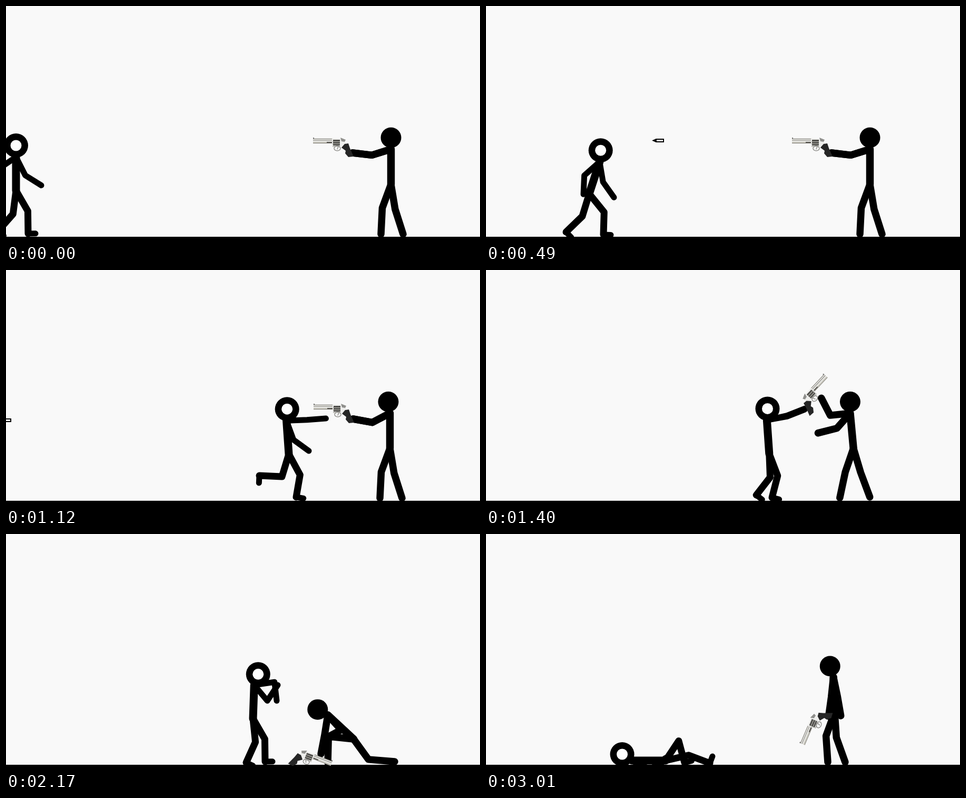
Recreate the animation shown at these times as an HTML page with a canvas. Size 900x450 px, loop 3290 ms.

```html
<!DOCTYPE html>
<html lang="en">
<head>
<meta charset="utf-8">
<title>Stick duel</title>
<style>
html, body { margin: 0; width: 100%; height: 100%; overflow: hidden; background: #f9f9f9; }
canvas { display: block; }
</style>
</head>
<body>
<canvas id="stage" width="900" height="450"></canvas>
<script>
const ctx = document.getElementById('stage').getContext('2d');
const LOOP = 3290, STEP = 70, RAD = Math.PI / 180;
const DROP = 18, GRAB = 33; // ticks between which the gun is loose

const mix = (a, b, k) => a + (b - a) * k;
const from = ([x, y], len, deg) => [x + len * Math.sin(deg * RAD), y - len * Math.cos(deg * RAD)];

const runnerRig = { face: 1, torso: 64, head: 22, arm: [39, 36], leg: [45, 43] };
const gunmanRig = { face: -1, torso: 67, head: 22, arm: [38, 37], leg: [48, 50] };

// A pose gives hip height, body angles, hands and feet; x counts from the hip
const enter = { y: 352, lean: 0, nod: 0, hands: [[48, 342], [-33, 346]], feet: [[23, 434], [-34, 429]] };
const stride = { y: 358, lean: 18, nod: 5, hands: [[47, 365], [-11, 359]], feet: [[27, 436], [-44, 431]] };
const duck = { ...stride, y: 374, lean: 38 };
const leap = { y: 254, lean: 5, nod: 5, hands: [[64, 200], [-36, 240]], feet: [[28, 285], [-36, 285]] };
const reach = { y: 351, lean: -4, nod: 3, hands: [[72, 283], [38, 345]], feet: [[14, 433], [-56, 392]] };
const grapple = { y: 350, lean: -4, nod: 3, hands: [[66, 262], [62, 240]], feet: [[3, 434], [-12, 434]] };
const guard = { y: 352, lean: 2, nod: 20, hands: [[45, 318], [47, 288]], feet: [[23, 434], [-13, 436]], crossed: true };
const punch = { ...guard, nod: 5, hands: [[85, 280], [45, 298]], crossed: false };
const cower = { ...guard, nod: 11, lean: 0, hands: [[28, 336], [39, 305]], feet: [[15, 437], [-25, 437]] };
const shot = { ...cower, lean: -20, nod: -25 };
const topple = { y: 397, lean: -53, nod: -60, hands: [[6, 322], [-4, 393]], feet: [[38, 425], [50, 436]] };
const lying = { y: 432, lean: -90, nod: -57, hands: [[0, 427], [0, 431]], feet: [[36, 436], [84, 437]] };

const both = (x, y) => [[x, y], [x, y]];
const aim = { y: 340, lean: 0, nod: 0, hands: both(-73, 280), feet: [[-19, 435], [23, 435]], tilt: 0 };
const recoil = { ...aim, lean: 14, nod: 22, hands: both(-36, 240), tilt: 55 };
const kick = { ...recoil, lean: 0, nod: 0 };
const lower = { ...aim, nod: -8, hands: both(-70, 284) };
const lunge = { ...aim, lean: -8, hands: [[-72, 250], [-37, 345]], feet: [[-30, 436], [36, 434]] };
const wrestle = { ...aim, y: 345, nod: -3, hands: [[-73, 260], [-18, 356]], feet: [[-22, 436], [28, 436]] };
const kneel = { y: 391, lean: -47, nod: -61, hands: [[-63, 425], [-56, 391]], feet: [[-49, 436], [78, 434]], tilt: 0 };
const grab = { ...kneel, hands: [[-98, 424], [-56, 391]], tilt: -25 };
const threat = { ...aim, lean: -2, nod: -6, hands: both(-73, 292) };
const stand = { ...aim, lean: -2, nod: -17, hands: [[-12, 352], [12, 348]], feet: [[-13, 435], [20, 435]], tilt: -67 };
const relax = { ...stand, lean: 5, nod: 8, tilt: -35 };

const swap = p => ({ ...p, hands: [...p.hands].reverse(), feet: [...p.feet].reverse() });

// Tick, hip x, pose
const runner = [
  [0, 19, enter], [3.5, 108, swap(stride)], [7, 196, stride], [8, 218, duck],
  [9.7, 290, swap(stride)], [11.4, 366, leap], [16, 537, reach], [21, 538, grapple],
  [25, 530, grapple], [28, 506, punch], [31, 469, guard], [36, 447, cower],
  [39, 440, shot], [41, 395, topple], [43, 341, lying]
];
const gunman = [
  [0, 731, aim], [3.6, 731, aim], [5, 733, recoil], [7, 729, aim], [8.5, 729, aim],
  [10, 729, kick], [12, 729, aim], [16, 729, lower], [DROP, 729, kick], [21, 682, lunge],
  [25, 631, wrestle], [31, 660, kneel], [GRAB, 660, grab], [36, 628, threat],
  [37, 628, threat], [39, 632, recoil], [41, 672, relax], [43, 662, stand]
];

// Two bones from a to target, bent to the given side
function bend(a, target, [l1, l2], side) {
  const dx = target[0] - a[0], dy = target[1] - a[1];
  const d = Math.max(1, Math.min(Math.hypot(dx, dy), l1 + l2 - .01));
  const dir = Math.atan2(dy, dx);
  const mid = dir + side * Math.acos((l1 * l1 + d * d - l2 * l2) / (2 * l1 * d));
  return [
    [a[0] + l1 * Math.cos(mid), a[1] + l1 * Math.sin(mid)],
    [a[0] + d * Math.cos(dir), a[1] + d * Math.sin(dir)]
  ];
}

// Joints in order: hip, neck, head, elbow and hand twice, knee and foot twice
const PARENT = [-1, 0, 1, 1, 3, 1, 5, 0, 7, 0, 9];

function joints(rig, x, p) {
  const hip = [x, p.y], neck = from(hip, rig.torso, p.lean);
  const at = ([dx, y]) => [x + dx, y];
  const arm = (hand, i) => bend(neck, at(hand), rig.arm, p.crossed && i === 0 ? -rig.face : rig.face);
  const leg = foot => bend(hip, at(foot), rig.leg, -rig.face);
  return [hip, neck, from(neck, rig.head, p.nod), ...p.hands.flatMap(arm), ...p.feet.flatMap(leg)];
}

function span(track, t) {
  let i = 0;
  while (i < track.length - 2 && track[i + 1][0] <= t) i++;
  const a = track[i], b = track[i + 1];
  return [a, b, (t - a[0]) / (b[0] - a[0])];
}

// Blends bone angles and lengths, walking out from the hip
function figure(rig, track, t) {
  const [[, ax, pa], [, bx, pb], k] = span(track, t);
  const a = joints(rig, ax, pa), b = joints(rig, bx, pb), out = [];
  a.forEach((p, i) => {
    const j = PARENT[i], ra = a[j] || [0, 0], rb = b[j] || [0, 0], root = out[j] || [0, 0];
    const u = [p[0] - ra[0], p[1] - ra[1]], v = [b[i][0] - rb[0], b[i][1] - rb[1]];
    if (j < 0) return out.push([mix(u[0], v[0], k), mix(u[1], v[1], k)]);
    const start = Math.atan2(u[1], u[0]), diff = Math.atan2(v[1], v[0]) - start;
    const angle = start + k * Math.atan2(Math.sin(diff), Math.cos(diff));
    const len = mix(Math.hypot(...u), Math.hypot(...v), k);
    out.push([root[0] + len * Math.cos(angle), root[1] + len * Math.sin(angle)]);
  });
  return { p: out, tilt: mix(pa.tilt, pb.tilt, k) };
}

function line(points, width) {
  ctx.strokeStyle = '#000';
  ctx.lineCap = ctx.lineJoin = 'round';
  ctx.lineWidth = width;
  ctx.beginPath();
  points.forEach(q => ctx.lineTo(...q));
  ctx.stroke();
}

function body([hip, neck, , e1, h1, e2, h2, k1, f1, k2, f2], arm, leg, torso) {
  line([hip, neck], torso);
  line([neck, e1, h1], arm);
  line([neck, e2, h2], arm);
  line([hip, k1, f1], leg);
  line([hip, k2, f2], leg);
}

// Toes stand square to the shin
function toes(knee, foot) {
  const a = Math.atan2(foot[1] - knee[1], foot[0] - knee[0]) - Math.PI / 2;
  line([foot, [foot[0] + 14 * Math.cos(a), foot[1] + 14 * Math.sin(a)]], 11);
}

function disc([x, y], r, color) {
  ctx.fillStyle = color;
  ctx.beginPath();
  ctx.arc(x, y, r, 0, 7);
  ctx.fill();
}

function box(color, x, y, w, h) {
  ctx.fillStyle = color;
  ctx.fillRect(x, y, w, h);
}

function shape(color, ...points) {
  ctx.fillStyle = color;
  ctx.beginPath();
  points.forEach(q => ctx.lineTo(...q));
  ctx.closePath();
  ctx.fill();
}

function revolver(x, y, deg, flip) {
  ctx.save();
  ctx.translate(x, y);
  ctx.rotate(deg * RAD);
  if (flip) ctx.scale(-1, 1);
  // barrel
  box('#666', -70, -25, 2, 3);
  box('#e9e9e6', -70, -23, 38, 9);
  for (const y of [-23.4, -20.5, -15]) box('#85837c', -70, y, 38, 1.1);
  box('#c9c7bd', -70, -17, 38, 2);
  box('#55534e', -44, -17, 10, 2);
  // frame, hammer, cylinder
  shape('#eeeeec', [-34, -24], [-15, -23], [-8, -16], [-10, -8], [-34, -9]);
  shape('#8f8f8c', [-18, -25], [-8, -21], [-10, -17], [-16, -18]);
  box('#4d4c49', -32, -21, 13, 11);
  for (const y of [-18, -14, -9]) box('#a8a7a0', -33, y, 14, 1.4);
  // guard
  ctx.strokeStyle = '#92918d';
  ctx.lineWidth = 1.5;
  ctx.beginPath();
  ctx.ellipse(-24, -4.5, 6, 4.5, 0, 0, 7);
  ctx.moveTo(-22, -8);
  ctx.lineTo(-24, -3);
  ctx.stroke();
  // grip
  shape('#262626', [-10, -13], [-3, -14], [0, -5], [7, 11], [-3, 12], [-9, 5], [-8, 0], [-16, -6]);
  ctx.restore();
}

function bullet(x, y) {
  ctx.strokeStyle = '#000';
  ctx.lineWidth = 2;
  ctx.lineJoin = 'miter';
  box('#fff', x + 8, y - 2.5, 14, 5);
  ctx.strokeRect(x + 8, y - 2.5, 14, 5);
  shape('#000', [x, y], [x + 8, y - 3.5], [x + 8, y + 3.5]);
}

// The knocked-away gun spins while it falls and comes to rest on the ground
function looseGun(s) {
  const k = Math.min(1, s / 8), ease = 1 - (1 - k) ** 2;
  revolver(mix(662, 546, ease), mix(237, 430, .46 * k + .54 * k * k), mix(-100, 21, ease), true);
}

function draw(t) {
  box('#f9f9f9', 0, 0, 900, 450);
  box('#000', 0, 440, 900, 10);

  const { p: g, tilt } = figure(gunmanRig, gunman, t);
  body(g, 13.5, 13.5, 14.5);
  disc(g[2], 19.5, '#000');

  const { p: r } = figure(runnerRig, runner, t);
  body(r, 11, 13, 15);
  toes(r[7], r[8]);
  toes(r[9], r[10]);
  disc(r[2], 23, '#000');
  disc(r[2], 10.5, '#fdfdfd');

  if (t > DROP && t < GRAB) looseGun(t - DROP);
  else revolver(g[4][0] - 5, g[4][1] - 4, tilt, false);

  if (t >= 4) bullet(315 - 80 * (t - 7), 256.5);
  if (t >= 9) bullet(-13 - 80 * (t - 16), 286.5 + 3 * (t - 16));
}

function frame(now) {
  const tick = Math.floor(now % LOOP / STEP);
  draw(tick === 37 ? 36 : Math.min(tick, 43));
  requestAnimationFrame(frame);
}
requestAnimationFrame(frame);
</script>
</body>
</html>
```
